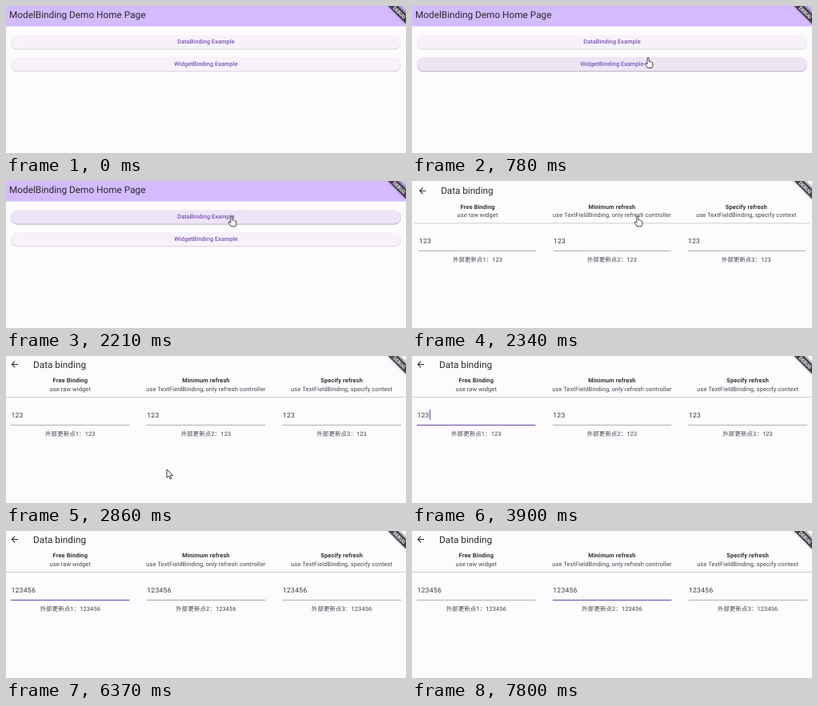
Animation, 500 px wide and 184 px high, one loop 8 s. Source, as an HTML page:

```html
<!DOCTYPE html>
<html lang="zh-CN">
<head>
<meta charset="utf-8">
<title>Data binding demo</title>
<style>
  html, body { margin: 0; width: 100%; height: 100%; overflow: hidden; background: #fefbff; }
  svg { display: block; width: 500px; height: 184px; }
  text {
    font-family: Roboto, "Noto Sans CJK SC", "Noto Sans CJK", sans-serif;
    fill: #2b292d;
    white-space: pre;
    text-rendering: geometricPrecision;
  }
  .title { font-size: 11.8px; }
  .label { font-size: 7.45px; letter-spacing: .12px; text-anchor: middle; fill: #444147; }
  .head { font-weight: 700; fill: #343136; }
  .value { font-size: 8.6px; letter-spacing: .27px; fill: #3b383e; }
  .button { font-size: 7.4px; font-weight: 500; letter-spacing: .05px; text-anchor: middle; fill: #7a54ba; }
  .debug { font-size: 6px; font-weight: 700; text-anchor: middle; fill: #fff; }
  .pointer path { fill: #fff; stroke: #26232a; stroke-width: .9; stroke-linejoin: round; }
</style>
</head>
<body>
<svg viewBox="0 0 500 184">
  <defs>
    <clipPath id="pill"><rect x="6" y="36.3" width="488" height="17.4" rx="8.7"/></clipPath>
    <filter id="soft" x="-5%" y="-50%" width="110%" height="200%"><feGaussianBlur stdDeviation=".7"/></filter>
    <filter id="glow" x="-30%" y="-30%" width="160%" height="160%"><feGaussianBlur stdDeviation="1.5"/></filter>
  </defs>
  <rect width="500" height="184" fill="#fefbff"/>

  <g id="home">
    <rect width="500" height="25.5" fill="#d3bbfd"/>
    <text class="title" x="4" y="14.6">ModelBinding Demo Home Page</text>
    <g id="buttons"></g>
  </g>

  <g id="page">
    <path transform="translate(4.4 4.1) scale(.53)" fill="#2b292d"
      d="M20 11H7.83l5.59-5.59L12 4l-8 8 8 8 1.41-1.41L7.83 13H20z"/>
    <text class="title" x="34" y="14.7">Data binding</text>
    <rect y="51" width="500" height="1" fill="#cfccd1"/>
    <g id="fields"></g>
    <rect id="caret" y="67" width="1" height="13" fill="#6648ac"/>
  </g>

  <path d="M477 -1H491L501 9V23z" fill="#000" fill-opacity=".45" filter="url(#glow)"/>
  <path d="M477.5 0H489.5L500 10.5V22.5z" fill="#38323e" fill-opacity=".85"/>
  <text class="debug" transform="translate(491.6 8.2) rotate(45)" y="2.1">DEBUG</text>

  <g id="cursor" class="pointer">
    <path id="arrow" d="M0 0V10.4L2.5 8.1 4.2 12 5.9 11.2 4.2 7.5H7.5z"/>
    <path id="hand" d="M-1 .8Q-1 -.4 .1 -.4T1.2 .8V4.6Q2.2 4 2.9 4.9 4 4.5 4.5 5.4 6 5.2 6 6.8V9.3Q6 11 5 12.4H-.7Q-1.5 10.5 -3.4 8.2 -4 7 -3 6.6 -2 6.6 -1 8z"/>
  </g>
</svg>

<script>
  const LOOP = 8000, TICK = 130;
  const GRAY = [178, 175, 181], DARK = [112, 109, 115], PURPLE = [102, 72, 172];
  const $ = id => document.getElementById(id);

  function add(parent, tag, attrs, text = '') {
    const el = document.createElementNS('http://www.w3.org/2000/svg', tag);
    for (const key in attrs) el.setAttribute(key, attrs[key]);
    el.textContent = text;
    parent.append(el);
    return el;
  }

  function set(el, attrs) {
    for (const key in attrs) el.setAttribute(key, attrs[key]);
  }

  const show = (el, on) => el.style.display = on ? '' : 'none';
  const ramp = (t, from, to) => Math.min(1, Math.max(0, (t - from) / (to - from)));
  const mix = (a, b, k) => a.map((v, i) => v + (b[i] - v) * k);
  const rgb = c => `rgb(${c.map(Math.round)})`;

  function makeButton(label, y) {
    const g = add($('buttons'), 'g', {});
    const box = { x: 6, width: 488, height: 17.4, rx: 8.7 };
    const shadow = add(g, 'rect', { ...box, y: y + .8, fill: '#000', filter: 'url(#soft)' });
    add(g, 'rect', { ...box, y, fill: '#f7f2fa' });
    const tint = add(g, 'rect', { ...box, y, fill: '#6f43c0' });
    const ink = add(g, 'circle', { cx: 277.5, cy: 45, fill: '#6f43c0', 'clip-path': 'url(#pill)' });
    add(g, 'text', { class: 'button', x: 250, y: y + 11 }, label);
    return { shadow, tint, ink };
  }

  function makeField(name, note, x, center) {
    const g = $('fields');
    add(g, 'text', { class: 'label head', x: center, y: 33.1 }, name);
    add(g, 'text', { class: 'label', x: center, y: 44 }, note);
    return {
      value: add(g, 'text', { class: 'value', x: x + .4, y: 77 }),
      line: add(g, 'rect', { x, y: 86, width: 148.5, height: 1 }),
      echo: add(g, 'text', { class: 'label', x: center, y: 100 })
    };
  }

  const buttons = [
    makeButton('DataBinding Example', 36.3),
    makeButton('WidgetBinding Example', 64)
  ];
  const fields = [
    makeField('Free Binding', 'use raw widget', 6, 80.3),
    makeField('Minimum refresh', 'use TextFieldBinding, only refresh controller', 175.8, 250),
    makeField('Specify refresh', 'use TextFieldBinding, specify context', 345.5, 419.6)
  ];

  // Pointer path: time, x, y
  const path = [
    [390, 330, 116], [650, 305, 80], [910, 285, 50], [1040, 281.8, 44.4],
    [2340, 281.8, 44.4], [2470, 278, 58], [2600, 262, 85], [2860, 201, 142],
    [2990, 201, 142], [3250, 155, 106], [3380, 130, 88]
  ];

  function pointerAt(t) {
    const i = path.findIndex(p => p[0] > t);
    if (i < 1) return null;
    const [a, b] = [path[i - 1], path[i]];
    return mix(a, b, ramp(t, a[0], b[0])).slice(1);
  }

  function drawPointer(t) {
    const at = pointerAt(t);
    show($('cursor'), at);
    if (!at) return;
    set($('cursor'), { transform: `translate(${at})` });
    const hand = t >= 650 && t < 2470;
    show($('hand'), hand);
    show($('arrow'), !hand);
  }

  function drawHome(t) {
    const hover = [
      ramp(t, 780, 1040),
      ramp(t, 520, 780) * (1 - ramp(t, 780, 1040))
    ];
    const press = ramp(t, 1300, 1430) * (1 - ramp(t, 1950, 2210));
    buttons.forEach(({ shadow, tint, ink }, i) => {
      const pressed = i ? 0 : press;
      set(shadow, { 'fill-opacity': .2 + .16 * hover[i] });
      set(tint, { 'fill-opacity': .08 * hover[i] + .06 * pressed });
      set(ink, {
        r: t < 1430 ? 0 : 85.5 + (t - 1430) * .4,
        'fill-opacity': .065 * pressed
      });
    });
  }

  function lineColors(t) {
    const first = t < 3770
      ? mix(GRAY, DARK, ramp(t, 3250, 3510))
      : mix(mix(DARK, PURPLE, ramp(t, 3640, 3900)), GRAY, ramp(t, 7150, 7540));
    const second = mix(mix(GRAY, DARK, ramp(t, 6300, 6630)), PURPLE, ramp(t, 7150, 7410));
    return [first, second, GRAY];
  }

  function caretOn(t) {
    if (t < 3770) return false;
    const since = [3770, 5200, 5460, 5850, 7280].filter(s => s <= t).pop();
    return Math.floor((t - since) / 510) % 2 === 0;
  }

  function drawPage(t) {
    const zoom = t < 2470 ? .99 : 1;
    set($('page'), { transform: `translate(250 190) scale(${zoom}) translate(-250 -190)` });
    const length = 3 + [5200, 5460, 5850].filter(s => s <= t).length;
    const value = '123456'.slice(0, length);
    const colors = lineColors(t);
    fields.forEach(({ value: text, line, echo }, i) => {
      text.textContent = value;
      echo.textContent = `外部更新点${i + 1}：${value}`;
      set(line, { fill: rgb(colors[i]) });
    });
    set($('caret'), { x: (t < 7280 ? 7 : 177) + Math.round(length * 5.05) });
    show($('caret'), caretOn(t));
  }

  function draw(now) {
    const t = Math.floor((now % LOOP) / TICK) * TICK;
    const opened = t >= 2340;
    show($('home'), !opened);
    show($('page'), opened);
    if (opened) drawPage(t); else drawHome(t);
    drawPointer(t);
  }

  const start = performance.now();
  function frame() {
    draw(performance.now() - start);
    requestAnimationFrame(frame);
  }
  frame();
</script>
</body>
</html>
```
